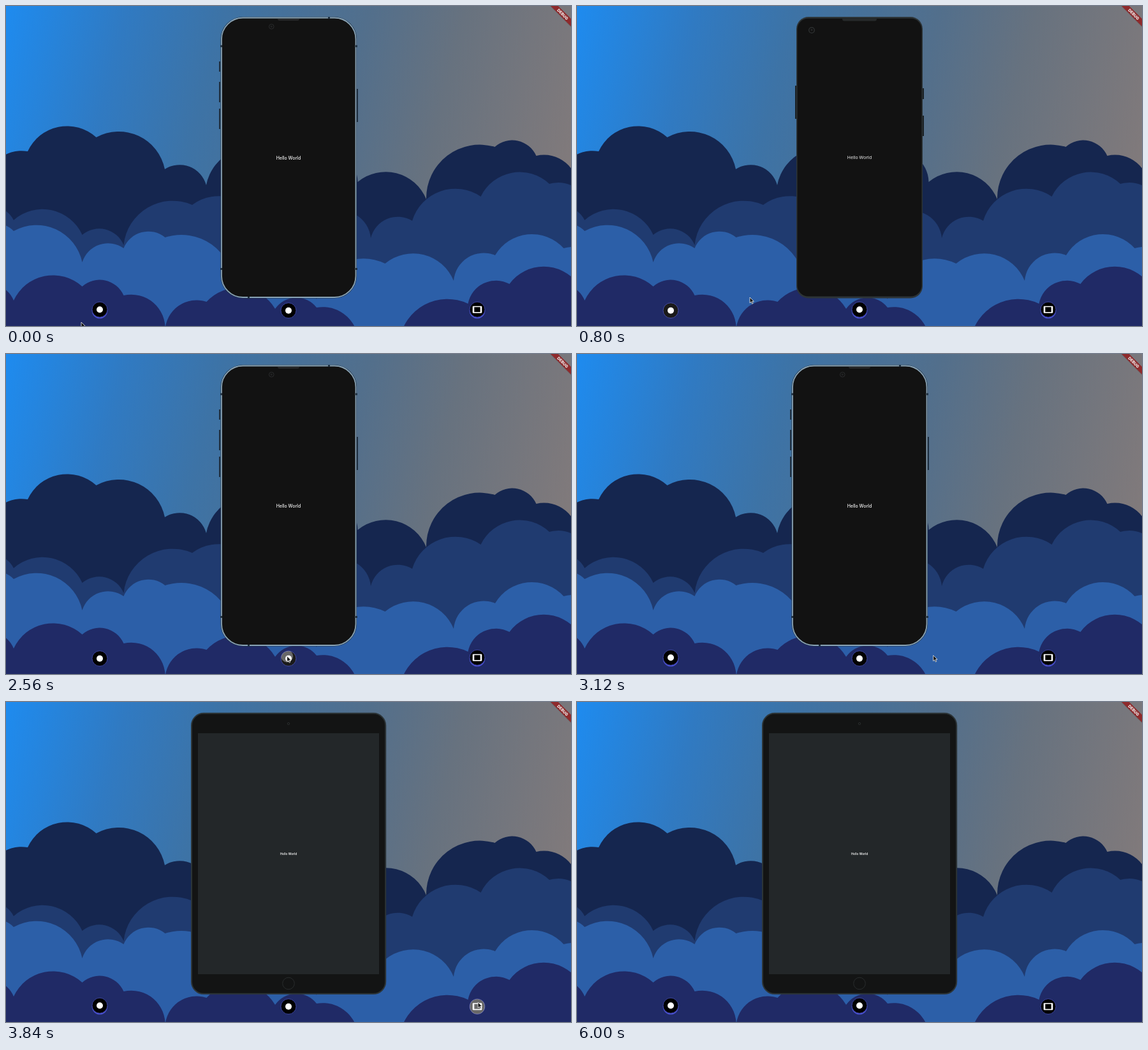
Animation, 886 px wide and 502 px high, one loop 6480 ms. Source, as an HTML page:

```html
<!DOCTYPE html>
<html lang="en">
<head>
<meta charset="utf-8">
<title>Device preview</title>
<style>
  html, body { margin: 0; width: 100%; height: 100%; overflow: hidden; background: #14264f; }
  svg { display: block; width: 886px; height: 502px; }
  text { fill: #f4f4f4; text-anchor: middle; font: 500 7px Inter, sans-serif; }
</style>
</head>
<body>
<svg viewBox="0 0 886 502">
  <defs>
    <linearGradient id="sky" gradientUnits="userSpaceOnUse" x1="0" y1="0" x2="894" y2="224">
      <stop offset="0" stop-color="#1e8bef"/>
      <stop offset=".2" stop-color="#307ac2"/>
      <stop offset=".36" stop-color="#3d73a6"/>
      <stop offset=".6" stop-color="#526f8c"/>
      <stop offset=".76" stop-color="#67727f"/>
      <stop offset="1" stop-color="#817a7b"/>
    </linearGradient>
    <clipPath id="disc"><circle r="12"/></clipPath>
  </defs>
  <rect width="886" height="502" fill="url(#sky)"/>
  <g id="clouds"></g>

  <g id="slim" fill="#1f3041">
    <path d="M334 87h2v16h-2zM334 119h2v32h-2zM334 161h2v32h-2zM550 130h2v52h-2z"/>
    <rect x="336.5" y="17" width="213.5" height="441.5" rx="35"/>
    <rect x="338" y="18.5" width="210.5" height="438.5" rx="33.5" fill="#121212" stroke="#8aa4b6" stroke-width="1.8"/>
    <path d="M336 61.5h3v3h-3zM548 61.5h3v3h-3zM336 411h3v3h-3zM548 411h3v3h-3zM505 17h3v3h-3zM379 456h3v3h-3z"/>
    <path d="M426 20h34q0 3-3 3h-28q-3 0-3-3z" fill="#262728"/>
    <g fill="none" stroke="#2b2c2e"><circle cx="416.3" cy="32.3" r="3.8"/><circle cx="416.3" cy="32.3" r="1"/></g>
    <text x="443" y="240.6">Hello World</text>
  </g>

  <g id="square" fill="#1a2024">
    <path d="M342 125h2.5v52h-2.5zM541.5 129h2.5v17h-2.5zM541.5 172h2.5v32h-2.5z"/>
    <rect x="344" y="17" width="198" height="441.5" rx="19" fill="#2d3437"/>
    <rect x="345.5" y="19.5" width="195" height="436" rx="17" fill="#121212"/>
    <path d="M416 20h54q0 3.5-3 3.5h-48q-3 0-3-3.5z" fill="#272a2b"/>
    <g fill="none" stroke="#303334"><circle cx="368" cy="38" r="4.3" stroke-width="1.3"/><circle cx="368" cy="37.5" r="1"/></g>
    <text x="443" y="239.7" style="font-family:'Noto Sans',sans-serif">Hello World</text>
  </g>

  <g id="tablet">
    <rect x="291" y="17.8" width="304.2" height="440" rx="19" fill="#131414" stroke="#2c3437" stroke-width="2"/>
    <rect x="301" y="49" width="284" height="378" fill="#232729"/>
    <g fill="none" stroke="#292c2d"><circle cx="443" cy="441.5" r="9.3"/><circle cx="443" cy="34" r="1.7"/></g>
    <text x="443" y="239.5" style="font-size:4.7px;font-weight:600">Hello World</text>
  </g>

  <g id="buttons"></g>

  <g transform="translate(873 13) rotate(45)">
    <rect x="-40" y="-3.9" width="80" height="8.8" opacity=".15"/>
    <rect x="-40" y="-4.2" width="80" height="8.4" fill="#8e2a2c"/>
    <text y="2.2" style="font-size:6.2px;font-weight:800">DEBUG</text>
  </g>

  <path id="cursor" d="M0 0v8.8l2.1-1.9 1.5 3.3 1.5-.7-1.5-3.2h2.8z" fill="#111" stroke="#f2f2f2" stroke-width=".8"/>
</svg>
<script>
const LOOP = 6480, STEP = 80;
const $ = id => document.getElementById(id);
const clamp = v => Math.max(0, Math.min(1, v));

// A cloud bank is a row of wide (W) and narrow (n) puffs, all the same kind of arc.
// The heights are those of the notches between puffs.
function bank(color, x, puffs, [y, ...notches]) {
  let d = `M${x} 600V${y}`;
  notches.forEach((next, i) => {
    const w = puffs[i] == 'W' ? 107.5 : 65, r = .62 * Math.hypot(w, next - y);
    x += w;
    y = next;
    d += `A${r} ${r} 0 0 1 ${x} ${y}`;
  });
  return `<path fill="${color}" d="${d}V600z"/>`;
}
$('clouds').innerHTML =
  bank('#15264f', -31, 'nWWnWnnWWnn', [290, 228, 206, 256, 281, 230, 230, 276, 303, 221, 235, 290]) +
  bank('#203b70', -53, 'nWnWWWnnWWn', [325, 336, 359, 375, 312, 345, 325, 364, 337, 299, 279, 330]) +
  bank('#2c5fa8', -53, 'nWnnWnnWWnWn', [362, 353, 402, 380, 363, 440, 440, 460, 404, 431, 391, 380, 430]) +
  bank('#202a66', -53, 'nWnnnWnnnWnW', [445, 462, 440, 454, 510, 464, 475, 473, 535, 525, 467, 436, 436]);

// down: spans in which a button is lowered; tap: ripple start and release
const dot = '<circle r="5" fill="#fff"/>';
const slab = '<rect x="-7.3" y="-5.5" width="14.6" height="11" rx="1.2" fill="#fff"/><rect x="-4.7" y="-3.9" width="9.4" height="7.8"/>';
const buttons = [
  { x: 147, icon: dot, down: [[400, 2760]], tap: [360, 570] },
  { x: 443, icon: dot, down: [[0, 680], [2500, 4040]], tap: [2500, 2800] },
  { x: 739, icon: slab, down: [[3640, LOOP]], tap: [3640, 4000] }
];
$('buttons').innerHTML = buttons.map(b => `<g>
  <circle cy="1.8" r="12.3" fill="#4a50d4"/>
  <circle r="12" stroke="#4149a8" stroke-width=".9"/>${b.icon}
  <g clip-path="url(#disc)"><circle fill="#fff"/><circle r="12" fill="#fff"/></g></g>`).join('');
buttons.forEach((b, i) => {
  b.node = $('buttons').children[i];
  b.shadow = b.node.firstElementChild;
  [b.ripple, b.hover] = b.node.lastElementChild.children;
});

// Stops of the pointer: time, x, y
const trail = [[0, 118, 496], [320, 147, 476], [560, 149, 476], [800, 271, 457], [1920, 431, 474],
  [2640, 441, 474], [3760, 740, 471], [4720, 744, 474], [5200, 752, 482], [5840, 752, 482], [6000, 760, 514]];

function pointer(t) {
  const i = trail.findIndex(stop => stop[0] > t);
  if (i < 0) return trail.at(-1).slice(1);
  const [t0, x0, y0] = trail[i - 1], [t1, x1, y1] = trail[i];
  const u = (t - t0) / (t1 - t0), e = u * u * (3 - 2 * u);
  return [x0 + (x1 - x0) * e, y0 + (y1 - y0) * e];
}

function draw(t) {
  const device = t < 480 ? 'slim' : t < 2520 ? 'square' : t < 3840 ? 'slim' : 'tablet';
  for (const id of ['slim', 'square', 'tablet']) $(id).style.display = id == device ? '' : 'none';

  const [mx, my] = pointer(t);
  $('cursor').setAttribute('transform', `translate(${mx} ${my})`);

  for (const b of buttons) {
    const low = b.down.some(([from, to]) => t >= from && t < to);
    const y = low ? 477.7 : 476.2, [start, release] = b.tap;
    const [px, py] = pointer(start + 60);
    b.node.setAttribute('transform', `translate(${b.x} ${y})`);
    b.shadow.style.display = low ? 'none' : '';
    b.ripple.setAttribute('cx', px - b.x);
    b.ripple.setAttribute('cy', py - y);
    b.ripple.setAttribute('r', 3 + 22 * clamp((t - start) / 200));
    b.ripple.setAttribute('opacity', t < start ? 0 : .34 * (1 - clamp((t - release) / 330)));
    b.hover.setAttribute('opacity', Math.hypot(mx - b.x, my - y) < 11 ? .1 : 0);
  }
}

const begin = performance.now();
function tick() {
  const t = (performance.now() - begin) % LOOP;
  draw(t - t % STEP);
  requestAnimationFrame(tick);
}
tick();
</script>
</body>
</html>
```
